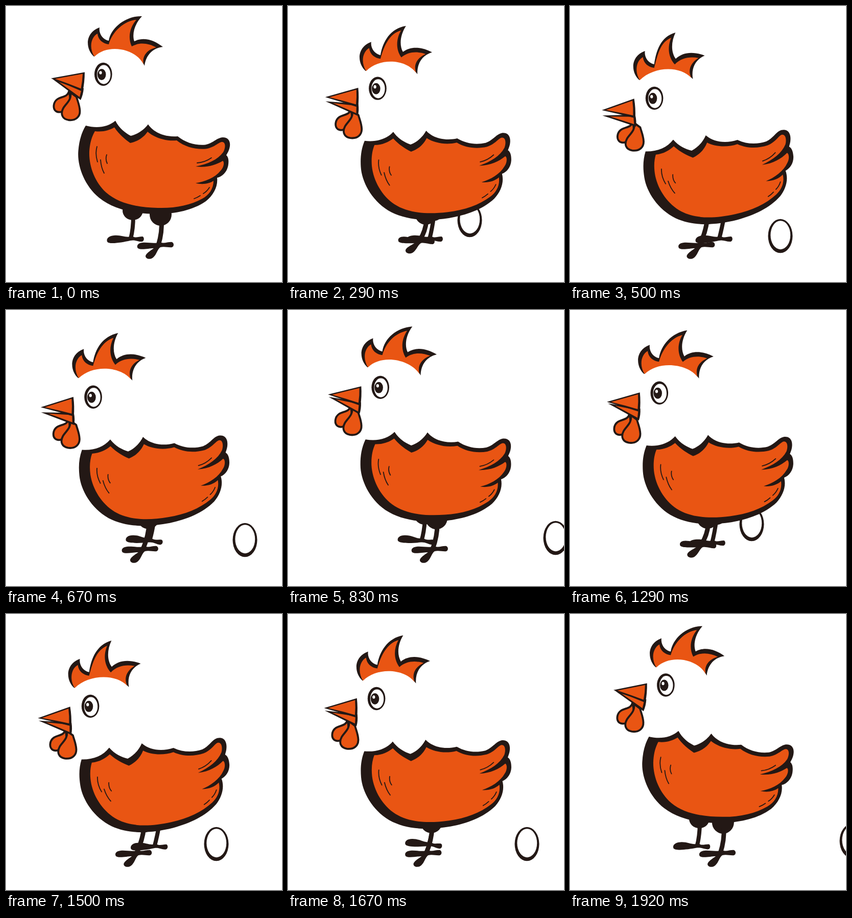
An HTML page for the animation above (1960 ms loop, 540x540 px).

```html
<!DOCTYPE html>
<html lang="en">
<head>
<meta charset="utf-8">
<title>Hen laying eggs</title>
<style>
  html, body { margin: 0; width: 100%; height: 100%; overflow: hidden; background: #fff; }
  svg { display: block; width: 100vw; height: 100vh; }
  .ink { fill: #231815; }
  .fill { fill: #e95513; }
  .white { fill: #fff; }
  .outline { fill: #e95513; stroke: #231815; stroke-width: 3.8; stroke-linejoin: round; }
  .leg { fill: none; stroke: #231815; stroke-width: 8; }
  .mark { fill: none; stroke: #231815; stroke-width: 1.8; stroke-linecap: round; }
</style>
</head>
<body>
<svg viewBox="0 0 540 540">
  <g id="egg">
    <ellipse class="ink" rx="24" ry="33.3"/>
    <ellipse class="white" cx=".3" cy="-1.8" rx="19.4" ry="28"/>
  </g>

  <ellipse id="thighL" class="ink" cx="248" cy="400" rx="20" ry="19"/>
  <ellipse id="thighR" class="ink" cx="302.5" cy="408" rx="21.5" ry="22"/>
  <path id="legL" class="leg"/>
  <path id="legR" class="leg" style="stroke-width:9"/>
  <path id="footL" class="ink" d="M247 450C235 455 226 447 211 449C200 450 196 456 198 461C201 467 226 463 243 459C252 457 257 461 265 461C271 461 271 452 267 451C259 451 253 455 247 450Z"/>
  <path id="footR" class="ink" d="M302 462C290 466 280 462 267 463C257 464 255 470 258 474C264 478 280 474 289 474C282 479 274 484 273 489C273 495 282 497 288 492C295 486 296 476 302 472C310 470 318 473 325 472C329 470 329 464 325 462C317 461 309 466 302 462Z"/>

  <g id="body">
    <path class="ink" d="M156 234C178 240 199 237 214 224.500C222 240 233 248 244 254C258 251 270 242 278 231.500C289 248 312 257 336 255C352 268 371 273 390 271.500C406 268 412 258 424 257C436 257 440 266 437.500 277C436 284 433 288 431 292C436 296 436 305 434.500 313C432 325 423 334 413 336C415 353 406 370 391 382C365 400 332 406 298 407C250 407 211 398 182 375C152 350 139 311 141.500 283C143 265 147 249 156 234Z"/>
    <path class="fill" d="M174 245C190 247 202 243 212 237.500C222 252 232 260 243 268C259 265 270 256 277 246C291 258 313 265 334 263C350 276 371 281 391 279.500C408 277 416 266 423 266C431 267 429 279 425 286C414 301 395 309 371 314C393 317 411 311 424 303C428 305 426 316 420 322C409 336 389 344 371 346.500C384 350 397 348 406 342C406 358 397 370 384 377C360 390 331 396 297 395C253 394 219 385 196 365C174 345 162 314 163 285C164 268 168 255 174 245Z"/>
    <path class="mark" d="M178 275Q174 289 179 305M185 301Q186 316 192 327M197 291Q194 300 198 308M374 307Q389 306 402 297M368 377Q374 375 380 371M386 367Q393 363 398 355"/>
  </g>

  <path id="combInk" class="ink"/>
  <path id="combFill" class="fill"/>

  <g id="eye">
    <ellipse class="ink" cx="190.3" cy="133.5" rx="17.3" ry="22.7"/>
    <ellipse class="white" cx="191.3" cy="134.2" rx="13.2" ry="18.6"/>
    <ellipse class="ink" cx="187.2" cy="134" rx="8.3" ry="11"/>
    <ellipse class="white" cx="185" cy="130.5" rx="2.6" ry="3.3"/>
  </g>

  <g id="wattle">
    <path class="outline" d="M123 167C121 178 109 177 101 182C92 188 91 201 98 206C105 210 113 206 119 200C126 191 127 180 123 167Z"/>
    <path class="outline" d="M126 169C129 184 117 191 112 200C106 211 110 221 122 223C137 225 145 216 144.500 205C144 194 140 186 138 178Z"/>
  </g>

  <g id="beak">
    <g id="jaw">
      <path class="ink" d="M90.500 142.500L152 161Q151 174 146 184Q121 165 90.500 142.500Z"/>
      <path class="fill" d="M104 149L147.500 164L144 178Q125 164 104 149Z"/>
    </g>
    <path class="ink" d="M88 141.500L154 129.500Q154 149 150 167.500Q119 154 88 141.500Z"/>
    <path class="fill" d="M96 142.500L150 132.800Q149.500 147 146.500 161.500Q123 152 96 142.500Z"/>
  </g>
</svg>
<script>
const LOOP = 1960, FRAMES = 47;
const el = id => document.getElementById(id);
const place = (id, value) => el(id).setAttribute("transform", value);
const draw = (id, d) => el(id).setAttribute("d", d);

// Linear interpolation over [time, value] pairs
function track(keys, t) {
  const i = keys.findIndex(key => key[0] >= t);
  if (i < 0) return keys[keys.length - 1][1];
  if (i === 0) return keys[0][1];
  const [t0, v0] = keys[i - 1], [t1, v1] = keys[i];
  return v0 + (v1 - v0) * (t - t0) / (t1 - t0);
}

const TILT = [[0, 0], [.29, -8.1], [.5, -13.8], [.55, -13.8], [.667, -10.8], [.7, -9.2], [.957, -1.6], [1, 0]];
const STEP_L = [[0, 0], [.29, 33], [.5, 48], [.667, 37], [.7, 31], [1, 0]];
const STEP_R = [[0, 0], [.29, -41], [.45, -49], [.68, -29], [1, 0]];
const LOBE_X = [[7, 0], [16, -4], [24, -3], [31, -6], [40, -3], [46, 0]];
const LOBE_Y = [[7, 0], [16, -3], [24, -7], [31, -3], [40, -1], [46, 0]];
const JAW = [[0, 0], [7, -7], [12, -9], [16, -8.5], [23, 0], [24, 0], [31, -2], [36, -4], [40, -4], [46, 0]];
const WATTLE_X = [[0, 0], [24, -1], [31, -7], [40, -7], [46, -1], [47, 0]];
const WATTLE_Y = [[16, 0], [24, -3], [31, 0]];
const ROLL_Y = [[16, 450], [22, 444]];

function drawComb(k, frame) {
  const angle = -10.3 * k * Math.PI / 180, c = Math.cos(angle), s = Math.sin(angle);
  const lx = -20 * k + track(LOBE_X, frame), ly = 28 * k + track(LOBE_Y, frame);
  // front points slide, rear points turn about the tall tip
  const a = (x, y) => `${x + lx} ${y + ly} `;
  const b = (x, y) => {
    const dx = x - 266, dy = y - 20;
    return `${266 - 35 * k + dx * c - dy * s} ${20 + 18.8 * k + dx * s + dy * c} `;
  };
  draw("combInk", `M${a(172, 99)}C${a(156, 85)}${a(153, 53)}${a(183, 42)}C${a(181, 54)}${a(190, 66)}${a(201, 68)}
    C${a(205, 42)}${b(235, 19)}${b(266, 20)}C${b(252, 35)}${b(246, 54)}${b(251, 69)}
    C${b(269, 60)}${b(289, 66)}${b(307, 80)}C${b(288, 82)}${b(274, 95)}${b(271, 117)}
    C${b(256, 82)}${a(200, 68)}${a(172, 99)}Z`);
  draw("combFill", `M${a(173, 99)}C${a(162, 82)}${a(166, 61)}${a(179, 54)}C${a(180, 66)}${a(190, 74)}${a(201, 75)}
    C${a(208, 50)}${b(231, 29)}${b(255, 27)}C${b(242, 42)}${b(238, 62)}${b(246, 79)}
    C${b(262, 70)}${b(279, 73)}${b(294, 81)}C${b(277, 85)}${b(266, 97)}${b(269, 114)}
    C${b(255, 84)}${a(200, 72)}${a(173, 99)}Z`);
}

function drawLegs(p) {
  const l = track(STEP_L, p), r = track(STEP_R, p), swing = Math.sin(2 * Math.PI * p);
  const liftL = Math.max(0, -swing), liftR = Math.max(0, swing);
  const hipL = l * 1.1, hipR = r * .8;
  place("thighL", `translate(${hipL} ${l * .05})`);
  place("thighR", `translate(${hipR} ${r * .05})`);
  draw("legL", `M${249 + hipL} 410Q${249 + l} 436 ${244 + l} ${455 - 5 * liftL}`);
  draw("legR", `M${304 + hipR} 418Q${306 + r * .9} 442 ${298 + r} ${468 - 9 * liftR}`);
  place("footL", `translate(${l} ${-5 * liftL}) rotate(${8 * liftL} 244 455)`);
  place("footR", `translate(${r} ${-9 * liftR}) rotate(${6 * liftR} 298 468)`);
}

function drawEgg(f) {
  const x = 355.5 + 14 * Math.max(0, f - 8);
  const y = f < 8 ? Math.max(345, 450 - 31 * (8 - f)) : track(ROLL_Y, f);
  place("egg", `translate(${x} ${y})`);
}

function render(time) {
  const t = 10 * Math.floor(time % LOOP / 10);
  const frame = Math.min(FRAMES - 1, Math.floor((t + 4.9) * .024));
  const p = frame < 24 ? frame / 24 : (frame - 24) / 23;
  const tilt = track(TILT, p), k = tilt / -8.1;

  place("body", `translate(${-4.5 * k} ${4 * k}) rotate(${tilt} 336 258)`);
  place("eye", `translate(${-14.8 * k} ${27.5 * k})`);
  place("beak", `translate(${-15 * k} ${36.5 * k}) rotate(${-5.5 * k} 89 142)`);
  place("jaw", `rotate(${track(JAW, frame)} 149 168)`);
  place("wattle", `translate(${track(WATTLE_X, frame)} ${35 * k + track(WATTLE_Y, frame)})`);
  drawComb(k, frame);
  drawLegs(p);
  drawEgg(frame % 24);
}

const start = performance.now();
function tick() {
  render(performance.now() - start);
  requestAnimationFrame(tick);
}
tick();
</script>
</body>
</html>
```
